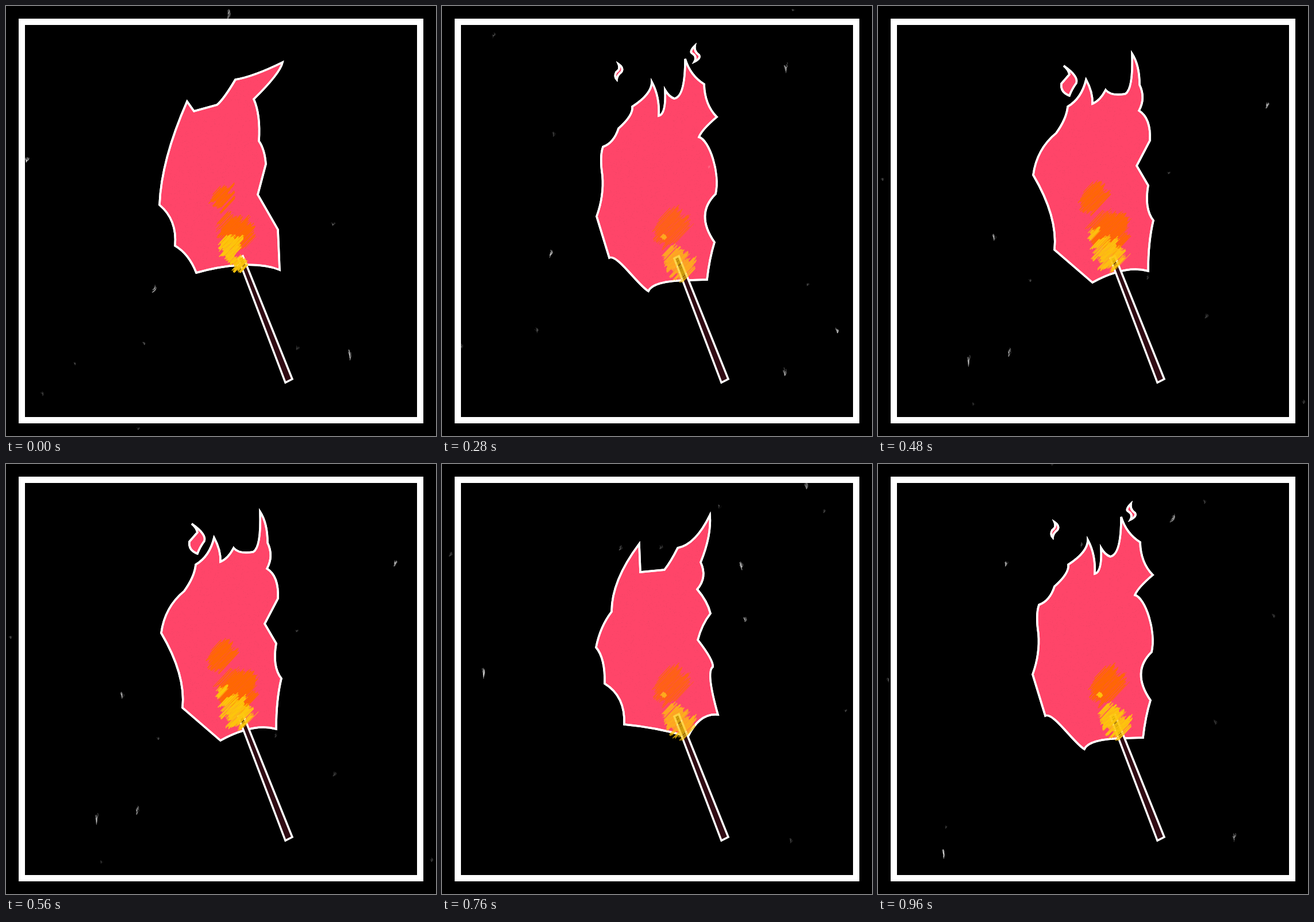
These frames come from a looping animation (748x748 px, 1000 ms). An HTML page with a canvas:

```html
<!DOCTYPE html>
<html lang="en">
<head>
<meta charset="utf-8">
<title>Burning match</title>
<style>
  html, body { margin: 0; width: 100%; height: 100%; overflow: hidden; background: #000; }
  canvas { display: block; width: 748px; height: 748px; }
</style>
</head>
<body>
<canvas id="stage" width="748" height="748"></canvas>
<script>
const SIZE = 748, LOOP = 1000, CUT = 600, HOLD = 120;
const PINK = '#ff4569', ORANGE = '#ff6900', YELLOW = '#fdc70c';
const ctx = document.getElementById('stage').getContext('2d');

const flames = {
  a: 'M315 166L327 183L367 172Q379 162 399 128Q430 123 481 98Q477 117 431 162Q443 189 440 235Q450 249 452 275L438 328L473 389L476 459Q449 448 404 451Q370 453 331 464Q318 431 294 417Q298 372 267 346Q270 268 315 166Z',
  b: 'M362 128Q374 150 373 170Q386 165 396 146Q405 157 430 153Q444 145 442 83Q455 103 455 137Q466 160 454 182Q475 195 473 234L450 278L470 312Q463 353 479 373Q470 410 470 461Q430 450 373 481L307 424Q313 367 270 294Q276 249 310 221Q328 196 330 175Q354 161 362 128Z' +
     'M323 104Q349 122 345 134Q337 145 333 156Q317 150 319 135L333 119Q331 110 323 104Z',
  c: 'M365 132Q379 158 377 191Q390 188 388 146Q395 158 404 161Q423 158 423 92Q432 121 456 136Q457 172 478 193Q452 215 447 228C465 233 484 290 476 327Q440 362 474 411Q465 440 461 476L428 477Q367 478 359 496C340 485 305 431 291 438L269 366Q282 330 279 295Q274 262 280 245Q299 238 307 213Q333 190 331 175Q365 153 365 132Z' +
     'M307 101Q317 108 312 115Q305 120 304 128Q299 122 303 115Q311 110 307 101Z' +
     'M440 69Q429 80 436 83Q444 88 439 97Q451 91 447 85Q438 79 440 69Z',
  d: 'M343 139L345 188L387 184Q398 170 410 146Q441 140 466 89Q469 124 450 171Q462 197 444 218Q462 239 467 260Q452 279 445 306Q473 342 471 353Q459 362 480 436Q448 433 428 474Q372 458 317 453Q319 404 283 382Q284 338 268 319Q275 283 295 257Q295 203 343 139Z'
};

// Scribbles: centre x, y, stroke length, spread across
const brush = {
  a: { orange: [[376, 334, 70, 34], [400, 391, 80, 66]], yellow: [[390, 417, 62, 34], [403, 447, 38, 32]] },
  b: { orange: [[377, 331, 88, 40], [403, 392, 88, 68]], yellow: [[374, 395, 36, 13], [402, 430, 80, 58]] },
  c: { orange: [[401, 382, 104, 50]], yellow: [[386, 402, 18, 8], [411, 446, 72, 58]] }
};

// The clearest specks of each scatter, largest first: x, y
const dust = {
  a: [[598, 607], [388, 15], [259, 493], [37, 268]],
  b: [[157, 619], [228, 604], [202, 404], [678, 173]],
  c: [[596, 640], [598, 108], [190, 432], [687, 565]],
  d: [[72, 364], [633, 40], [520, 178], [527, 272]],
  e: [[114, 679], [514, 97], [620, 650], [223, 174]]
};

// One letter per hold
const order = { flame: 'abcabcdbc', brush: 'abcabccbc', dust: 'abcabcdbe' };

function random(seed) {
  return () => {
    seed = (seed * 1664525 + 1013904223) >>> 0;
    return seed / 4294967296;
  };
}

function layer(paint) {
  const canvas = document.createElement('canvas');
  canvas.width = canvas.height = SIZE;
  paint(canvas.getContext('2d'));
  return canvas;
}

function outline(g, path, fill) {
  g.fillStyle = fill;
  g.fill(path);
  g.strokeStyle = '#fff';
  g.lineWidth = 3.5;
  g.miterLimit = 6;
  g.stroke(path);
}

// Diagonal bristles side by side; neighbours share their ends to form streaks
function scribble(g, rnd, [x, y, len, spread]) {
  const ux = 0.68, uy = -0.73;
  let from, to, left = 0;
  for (let o = -spread / 2; o <= spread / 2; o += 0.8) {
    const edge = Math.abs(o) / (spread / 2);
    const reach = len / 2 * (1 - 0.4 * edge * edge);
    if (left-- <= 0) {
      from = -reach * (0.55 + 0.45 * rnd());
      to = reach * (0.55 + 0.45 * rnd());
      left = 2 + rnd() * 6;
    }
    if (edge > 0.6 && rnd() < 0.25) continue;
    const s = from + rnd() * len * 0.12, e = to - rnd() * len * 0.12;
    const px = x - uy * o, py = y + ux * o;
    g.lineWidth = 0.8 + rnd() * 0.8;
    g.beginPath();
    g.moveTo(px + ux * s, py + uy * s);
    g.lineTo(px + ux * e, py + uy * e);
    g.stroke();
  }
}

function paintBrush({ orange, yellow }) {
  return layer(g => {
    const rnd = random(11);
    g.strokeStyle = ORANGE;
    orange.forEach(s => scribble(g, rnd, s));
    g.strokeStyle = YELLOW;
    yellow.forEach(s => scribble(g, rnd, s));
  });
}

function paintFlame(d, i) {
  return layer(g => {
    const rnd = random(31 + i), path = new Path2D(d);
    outline(g, path, PINK);
    g.globalCompositeOperation = 'source-atop';
    g.fillStyle = 'rgba(150,20,50,.08)';
    for (let n = 0; n < 5000; n++) g.fillRect(260 + rnd() * 230, 80 + rnd() * 420, 1.2, 1.2);
    g.globalCompositeOperation = 'source-over';
    outline(g, path, 'transparent');
  });
}

function wisp(g, rnd, x, y, len, light) {
  const lean = (rnd() - 0.3) * 0.8;
  for (let n = 0; n < 7; n++) {
    const h = len * (0.2 + rnd() * 0.4), top = y - len / 2 + rnd() * len * 0.4;
    const px = x + (rnd() - 0.5) * 6;
    g.globalAlpha = light * (0.4 + rnd() * 0.6);
    g.lineWidth = 0.7 + rnd();
    g.beginPath();
    g.moveTo(px, top);
    g.quadraticCurveTo(px + 2, top + h / 2, x - lean * h, top + h);
    g.stroke();
  }
}

function paintDust(specks, i) {
  return layer(g => {
    const rnd = random(70 + i);
    g.strokeStyle = '#fff';
    g.lineCap = 'round';
    specks.forEach(([x, y], n) => wisp(g, rnd, x, y, 24 - n * 4, 0.5));
    for (let n = 0; n < 7; n++) wisp(g, rnd, rnd() * SIZE, rnd() * SIZE, 5 + rnd() * 7, 0.14);
  });
}

function mapSet(set, paint) {
  return Object.fromEntries(Object.entries(set).map(([key, value], i) => [key, paint(value, i)]));
}

const layers = {
  flame: mapSet(flames, paintFlame),
  brush: mapSet(brush, paintBrush),
  dust: mapSet(dust, paintDust)
};
const stick = new Path2D('M404 439L412 435L498 649L486 655Z');

function show(name, t) {
  ctx.drawImage(layers[name][order[name][Math.floor(t / HOLD)]], 0, 0);
}

// The brushwork thins out once before and once after the cut
function glow(t) {
  const part = t < CUT ? t / CUT : (t - CUT) / (LOOP - CUT);
  return 1 - 0.22 * Math.sin(Math.PI * part) ** 3;
}

function draw(t) {
  ctx.fillStyle = '#000';
  ctx.fillRect(0, 0, SIZE, SIZE);

  show('flame', t);
  outline(ctx, stick, '#300b13');
  ctx.globalAlpha = glow(t);
  show('brush', t);
  ctx.globalAlpha = 1;

  ctx.lineWidth = 11;
  ctx.strokeRect(27.5, 27.5, 693, 693);
  show('dust', t);
}

const start = performance.now();
function tick() {
  draw((performance.now() - start) % LOOP);
  requestAnimationFrame(tick);
}
tick();
</script>
</body>
</html>
```
